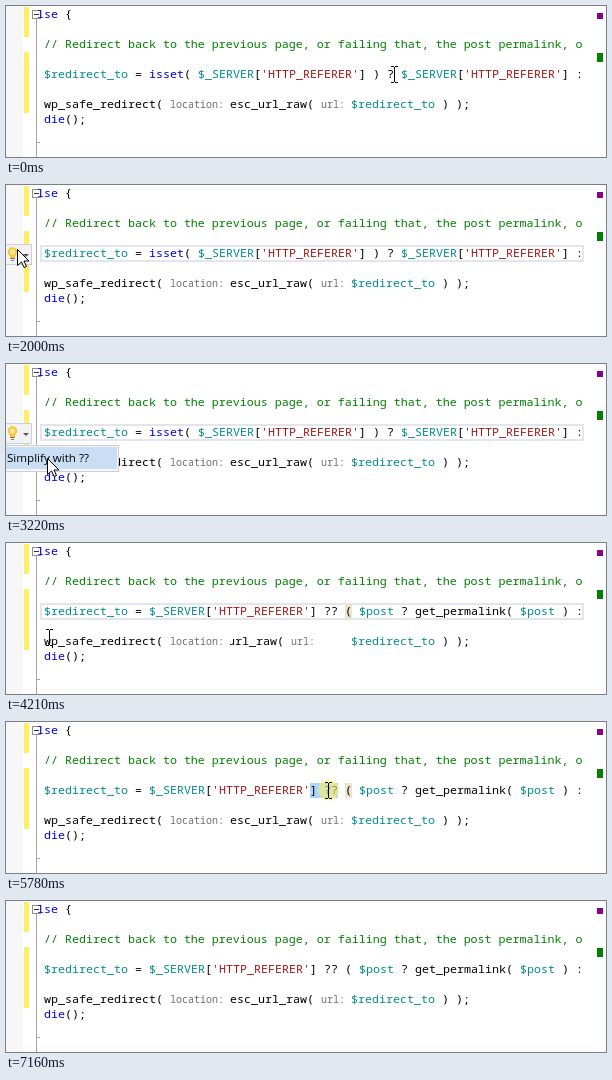
Recreate the animation shown at these times as an HTML page with a canvas. Size 600x151 px, loop 7820 ms.

```html
<!DOCTYPE html>
<html lang="en">
<head>
<meta charset="utf-8">
<title>Simplify with ??</title>
<style>
html, body { margin: 0; width: 600px; height: 151px; overflow: hidden; background: #fff; }
canvas { display: block; }
</style>
</head>
<body>
<canvas id="stage" width="600" height="151"></canvas>
<script>
const g = document.getElementById('stage').getContext('2d');
const LOOP = 7820, CW = 7, LEFT = 38;
const CODE = '11.667px "Noto Sans Mono", "DejaVu Sans Mono", monospace';
const HINT = '10px "Noto Sans Mono", "DejaVu Sans Mono", monospace';
const MENU = '11.6px "Open Sans", "Noto Sans", sans-serif';
const INK = { k: '#0000e6', v: '#008b8f', s: '#a31515', c: '#008000', p: '#000' };

const SERVER = [['v', '$_SERVER'], ['p', '['], ['s', "'HTTP_REFERER'"], ['p', ']']];
const ASSIGN = [['v', '$redirect_to'], ['p', ' = ']];
const BEFORE = [...ASSIGN, ['k', 'isset'], ['p', '( '], ...SERVER, ['p', ' ) ? '], ...SERVER, ['p', ' :']];
const AFTER = [...ASSIGN, ...SERVER, ['p', ' ?? ( '], ['v', '$post'],
  ['p', ' ? get_permalink( '], ['v', '$post'], ['p', ' ) :']];

// Pointer path: time, x, y
const PATH = [
  [0, 388, 68], [540, 388, 68], [1250, 131, 61], [1310, 131, 61],
  [2000, 11, 64], [2640, 11, 64], [3220, 41, 94], [3849, 41, 94],
  [3850, 43, 94], [4450, 43, 94], [5270, 303, 84], [5480, 306, 67],
  [5560, 306, 67], [5780, 322, 68], [5910, 323, 65], [6070, 323, 65],
  [6800, 449, 162], [LOOP, 449, 162]
];
const CLICKS = [[50, 180], [2360, 2500], [3600, 3720], [5500, 5910]];

const within = (t, a, b) => t >= a && t < b;

function box(color, x, y, w, h) {
  g.fillStyle = color;
  g.fillRect(x, y, w, h);
}

function disc(color, x, y, r) {
  g.fillStyle = color;
  g.beginPath();
  g.arc(x, y, r, 0, 2 * Math.PI);
  g.fill();
}

function frame(color, x, y, w, h, line = 1) {
  g.strokeStyle = color;
  g.lineWidth = line;
  g.strokeRect(x + line / 2, y + line / 2, w - line, h - line);
}

function text(str, x, y, color, font) {
  g.font = font;
  g.fillStyle = color;
  g.fillText(str, x, y);
}

function code(parts, x, y) {
  for (const [kind, str] of parts) {
    text(str, x, y, INK[kind], CODE);
    x += str.length * CW;
  }
}

function pointerAt(t) {
  const i = PATH.findIndex(p => p[0] > t);
  const [t0, x0, y0] = PATH[i - 1], [t1, x1, y1] = PATH[i];
  const u = (t - t0) / (t1 - t0), e = u * u * (3 - 2 * u);
  return [Math.round(x0 + (x1 - x0) * e), Math.round(y0 + (y1 - y0) * e)];
}

function gutter() {
  box('#f7f7f7', 0, 0, 17, 151);
  box('#ffee62', 18, 1, 5, 30);
  box('#ffee62', 18, 46, 5, 61);
  box('#a5a5a5', 30, 13, 1, 138);
  box('#a5a5a5', 30, 136, 4, 1);
  box('#fff', 26, 4, 9, 9);
  frame('#909090', 26, 4, 9, 9);
  box('#333', 28, 8, 5, 1);
  box('#8b008b', 591, 7, 6, 6);
  box('#008000', 591, 47, 6, 9);
}

function callLine(shifted) {
  const y = 102, dx = shifted ? -30 : 0;
  code([['p', 'wp_safe_redirect(']], LEFT, y);
  text('location:', 164, y, '#6e6e6e', HINT);
  g.save();
  g.beginPath();
  g.rect(224, 90, 121, 18);
  g.clip();
  code([['p', 'esc_url_raw(']], 224 + dx, y);
  text('url:', 315 + dx, y, '#6e6e6e', HINT);
  g.restore();
  code([['v', '$redirect_to'], ['p', ' ) );']], 345, y);
}

function bulb(open) {
  if (open) {
    box('#f2f2f2', 0, 59, 26, 21);
    frame('#cccedb', -1, 59, 27, 21);
    g.fillStyle = '#555';
    g.beginPath();
    g.moveTo(17, 69);
    g.lineTo(23, 69);
    g.lineTo(20, 72);
    g.fill();
  }
  disc('#fcc62b', 6.5, 67, 4.7);
  box('#fcc62b', 4, 70, 5, 3);
  disc('#ffe9a0', 6.5, 67, 2.7);
  box('#777', 4, 73, 5, 1);
  box('#777', 5, 75, 3, 1);
}

function menu() {
  box('#f6f6f6', 0, 81, 113, 27);
  frame('#cccedb', -1, 81, 114, 27);
  box('#c9def5', 0, 83, 111, 22);
  text('Simplify with ??', 1, 98, '#000', MENU);
}

function beam(x, y) {
  box('#000', x, y - 7, 1, 15);
  for (const dy of [-8, 8]) {
    box('#000', x - 3, y + dy, 3, 1);
    box('#000', x + 1, y + dy, 3, 1);
  }
}

function arrow(x, y) {
  const pts = [[0, 0], [0, 16], [4, 12.5], [6.5, 18], [9, 17], [6.5, 11.5], [11.5, 11.5]];
  g.beginPath();
  pts.forEach(([a, b]) => g.lineTo(x + a + .5, y + b + .5));
  g.closePath();
  g.fillStyle = '#fff';
  g.fill();
  g.strokeStyle = '#000';
  g.lineWidth = 1;
  g.stroke();
}

function draw(t) {
  const [x, y] = pointerAt(t);
  const changed = t >= 3850;
  box('#fff', 0, 0, 600, 151);
  gutter();

  if (within(t, 50, 5500)) frame('#e4e4ec', 34, 60, 544, 17, 2);
  if (within(t, 3850, 5860)) box('#ebe3cf', 339, 61, 7, 15);
  if (within(t, 5560, 7160)) {
    const end = t < 5910 ? Math.min(332, 304 + 7 * Math.round((x - 304) / 5)) : 332;
    box('#add6ff', 304, 61, end - 304, 15);
  }

  code([['k', 'lse'], ['p', ' {']], 31, 12);
  code([['c', '// Redirect back to the previous page, or failing that, the post permalink, o']], LEFT, 42);
  code(changed ? AFTER : BEFORE, LEFT, 72);
  callLine(within(t, 4210, 4490));
  code([['k', 'die'], ['p', '();']], LEFT, 117);

  if (within(t, 900, 3720)) bulb(t >= 1850);
  if (within(t, 2450, 3720)) menu();

  if (CLICKS.some(([a, b]) => within(t, a, b))) disc('rgba(255, 236, 100, .6)', x + .5, y, 10.5);
  if (within(t, 1850, 3850)) arrow(x, y);
  else if (t < 6800) beam(x, y);
}

const start = performance.now();
function tick() {
  draw((performance.now() - start) % LOOP);
  requestAnimationFrame(tick);
}
tick();
</script>
</body>
</html>
```
